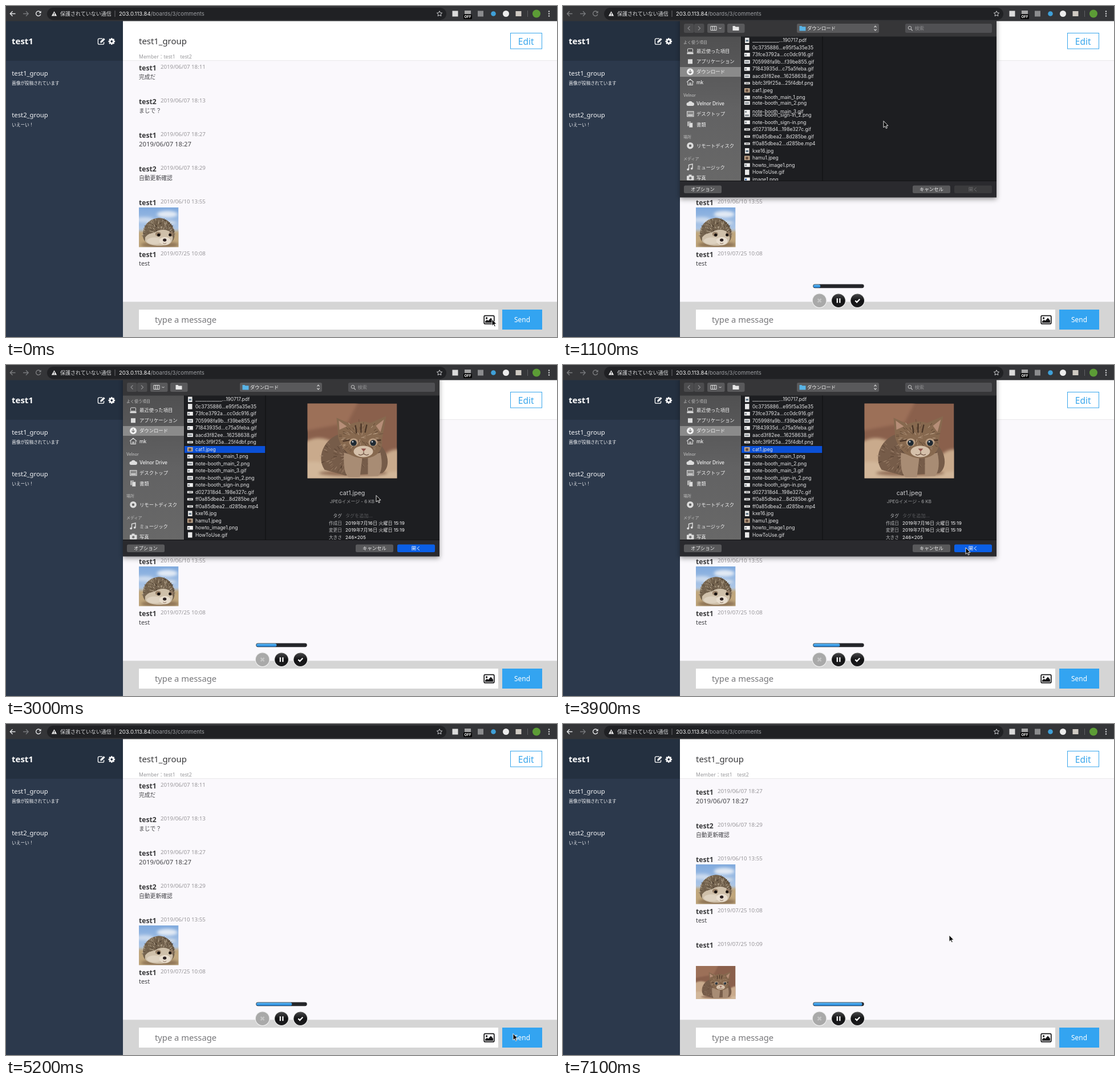
An HTML page that plays this animation: 966x580 px, repeating every 7200 ms.

```html
<!DOCTYPE html>
<html lang="ja">
<head>
<meta charset="utf-8">
<title>Group chat</title>
<style>
html,body{margin:0;width:100%;height:100%;overflow:hidden;background:#faf8fc}
svg{display:block;width:100vw;height:100vh}
text{font-family:'Noto Sans','Noto Sans CJK JP','Noto Sans CJK',sans-serif;white-space:pre}
.ui{font-family:Inter,'Noto Sans CJK JP','Noto Sans CJK',sans-serif}
</style>
</head>
<body>
<svg id="stage" viewBox="0 0 966 580" xmlns="http://www.w3.org/2000/svg"></svg>
<script>
const LOOP = 7200, STEP = 100;
const stage = document.getElementById('stage');

// ---- markup helpers; text is placed by its vertical centre
const text = (x, cy, s, size, fill, more = '') =>
  `<text x="${x}" y="${(cy + size * .36).toFixed(2)}" font-size="${size}" fill="${fill}" ${more}>${s}</text>`;
const ui = (x, cy, s, size, fill, more = '') => text(x, cy, s, size, fill, 'class="ui" ' + more);
const rect = (x, y, w, h, fill, more = '') =>
  `<rect x="${x}" y="${y}" width="${w}" height="${h}" fill="${fill}" ${more}/>`;
const circle = (x, y, r, fill, more = '') => `<circle cx="${x}" cy="${y}" r="${r}" fill="${fill}" ${more}/>`;
const oval = (x, y, rx, ry, fill, more = '') =>
  `<ellipse cx="${x}" cy="${y}" rx="${rx}" ry="${ry}" fill="${fill}" ${more}/>`;
const path = (d, fill, more = '') => `<path d="${d}" fill="${fill}" ${more}/>`;
const line = (d, color, w = 1, more = '') => path(d, 'none', `stroke="${color}" stroke-width="${w}" ${more}`);
const group = (id, body, more = '') => `<g id="${id}" ${more}>${body}</g>`;
const blur = (kind, body) => `<g filter="url(#${kind})">${body}</g>`;
const MID = 'text-anchor="middle"', END = 'text-anchor="end"', BOLD = 'font-weight="700"', SEMI = 'font-weight="500"';

let seed = 7;
const rnd = () => (seed = seed * 16807 % 2147483647) / 2147483647;

// short hairs that point away from a centre
function hairs(n, cx, cy, rx, ry, colors, len, turn = Math.PI) {
  let s = '';
  for (let i = 0; i < n; i++) {
    const a = Math.PI + turn * rnd(), r = Math.sqrt(rnd());
    const x = cx + Math.cos(a) * rx * r, y = cy + Math.sin(a) * ry * r;
    s += line(`M${x.toFixed(1)} ${y.toFixed(1)}l${(Math.cos(a) * len).toFixed(1)} ${(Math.sin(a) * len).toFixed(1)}`,
      colors[i % colors.length], .9);
  }
  return s;
}

const gradient = (id, ...stops) => `<linearGradient id="${id}" x2="0" y2="1">` +
  stops.map((c, i) => `<stop offset="${i / (stops.length - 1)}" stop-color="${c}"/>`).join('') + '</linearGradient>';
const clip = (id, x, y, w, h) => `<clipPath id="${id}">${rect(x, y, w, h, '#000')}</clipPath>`;

const hedgehog =
  rect(0, 0, 70, 70, 'url(#sky)') +
  blur('soft', oval(50, 12, 18, 6, '#e2eaf4') + oval(10, 22, 16, 5, '#cbdaee') + oval(40, 27, 26, 4, '#d9e2ea') +
    rect(-5, 41, 80, 34, '#c0a67c') + oval(37, 66, 34, 6, '#8f7556')) +
  blur('blend',
    path('M7 51C6 32 18 20 35 18.5C52 19 64 34 63 50C62 61 54 65 40 66C22 68 9 64 7 51Z', '#75644f') +
    hairs(170, 35, 50, 28, 30, ['#3f3327', '#c2b39c', '#5c4c3c', '#a1907a'], 3) +
    path('M11 53C16 45 24 46 30 43C37 38 50 38 56 44C63 52 60 62 51 66C38 69 15 68 11 59Z', '#cfc0aa') +
    oval(28, 59, 14, 6, '#ded2c0') + oval(46, 59, 10, 7, '#e8ddce') +
    oval(34, 47, 5, 4, '#9a836b') + oval(57, 47, 4, 4, '#8f7862') +
    circle(35, 48.5, 2.7, '#17110e') + circle(55, 48.5, 2.5, '#17110e') + oval(45.5, 57.5, 3.2, 2.6, '#2b2020') +
    line('M42.5 63q3 2 6 0', '#8b705c'));

const kitten =
  rect(0, 0, 157, 131, '#8a604c') +
  blur('soft', path('M-5 -5H90L70 34L-5 48Z', '#9c7059') + path('M-5 68Q20 52 50 70L130 96Q146 76 165 82V140H-5Z', '#c9aa8c') +
    path('M-5 104Q30 94 70 128L165 118V140H-5Z', '#d2b79a') + oval(80, 122, 60, 6, '#947058')) +
  blur('blend',
    path('M52 55C27 66 16 96 30 116L66 126L131 122C147 112 142 82 124 69Z', '#765c49') +
    hairs(110, 75, 92, 52, 28, ['#513b2d', '#9a7c65', '#674c3a', '#ad917a'], 6, 6.28) +
    path('M64 86Q62 122 72 129H92L96 96ZM106 92L106 127H124Q134 114 128 86Z', '#a88c74') +
    path('M54 60L51 25L76 36Q94 28 110 34L138 22L131 62Q133 92 103 96Q65 97 54 60Z', '#87694f') +
    hairs(90, 93, 60, 36, 28, ['#5b4332', '#ad9078', '#6d523f', '#c0a68d'], 5, 6.28) +
    path('M56 46L55 30L69 40ZM120 39L134 28L128 50Z', '#b68e78') +
    line('M84 38l2 14M94 35v16M104 37l-3 14M62 66l13-2M129 64l-12 1', '#4b3628', 2.4) +
    oval(98, 84, 17, 10, '#d5c0aa') + oval(81, 68, 8, 7, '#b99d83') + oval(115, 68, 8, 7, '#b99d83') +
    circle(81, 69, 5.2, '#202a33') + circle(115, 69, 5.2, '#202a33') +
    circle(79.5, 67, 1.3, '#dfe6ec') + circle(113.5, 67, 1.3, '#dfe6ec') +
    path('M94 79h9l-4.5 5Z', '#8e5049') + line('M98.5 84v4q-5 4-9 1m9-1q5 4 9 1', '#6c5040', 1.2));

// ---- browser bar
const nav = line('M16.5 13.5H7.5M11.5 9.3L7.3 13.5L11.5 17.7', '#e4e5e7', 1.4) +
  line('M60.2 10.8A4.2 4.2 0 1 0 60.8 14.5', '#e4e5e7', 1.4) + path('M61.6 8.4V12.6H57.4Z', '#e4e5e7');
const bar =
  rect(0, 0, 966, 26.5, '#343538') + rect(72, 3, 700, 21.5, '#202124', 'rx="10.7"') +
  group('nav', nav) +
  line('M30 13.5H39M35 9.3L39.2 13.5L35 17.7', '#77797c', 1.3) +
  path('M84.5 9.3L89.2 17.6H79.8Z', '#e8e8e8') + line('M84.5 12v3M84.5 15.6v1', '#202124', 1) +
  ui(95, 13.5, '保護されていない通信', 9, '#d8d9db') +
  rect(190.5, 8, 1, 11, '#6a6b6e') +
  ui(198, 13.5, '203.0.113.84<tspan fill="#9b9da1">/boards/3/comments</tspan>', 9.5, '#f2f2f2') +
  line('M760 8.8l1.4 3 3.2.4-2.4 2.2.7 3.2-2.9-1.6-2.9 1.6.7-3.2-2.4-2.2 3.2-.4Z', '#d0d1d3', 1) +
  rect(782.5, 8.5, 10, 10, '#dcdcdc') +
  rect(804, 8, 11, 6, '#a5a5a5') + rect(802, 14.5, 15, 8.5, '#050505', 'rx="1.5"') +
  ui(809.5, 18.8, 'OFF', 6.2, '#fff', MID + BOLD) +
  rect(827, 8.5, 10, 10, '#8b8c8e') + circle(854.5, 13.5, 4.3, '#3fa0d8') + circle(876.5, 13.5, 5.5, '#ececec') +
  rect(893.5, 9, 10, 9, '#cfcac3') + rect(914, 8, 1, 11, '#606164') + circle(930, 13.5, 7, '#5c9c36') +
  [9.5, 13.5, 17.5].map(y => circle(952, y, 1.2, '#d0d1d3')).join('');

// ---- chat page
const gear = () => {
  let s = circle(185.3, 62, 4.4, '#fff');
  for (let i = 0; i < 8; i++) s += rect(184, 56.2, 2.6, 3, '#fff', `transform="rotate(${i * 45} 185.3 62)"`);
  return s + circle(185.3, 62, 1.9, '#243040');
};
const side =
  rect(0, 26, 205, 554, '#2c394c') + rect(0, 26, 205, 70, '#243040') +
  text(10, 61.5, 'test1', 15, '#fff', BOLD) +
  line('M169 57.2H163.4Q161.4 57.2 161.4 59.2V65.4Q161.4 67.2 163.4 67.2H169.6Q171.6 67.2 171.6 65.4V63', '#fff', 1.3) +
  path('M165.3 64.6L165.6 61.8L171.2 56.2L173.6 58.6L168 64.2Z', '#fff') + gear() +
  text(10.3, 118, 'test1_group', 11.25, '#f4f5f7') + text(10.3, 135, '画像が投稿されています', 7.6, '#f4f5f7', SEMI) +
  text(10.3, 191, 'test2_group', 11.25, '#f4f5f7') + text(10.3, 208, 'いえーい！', 7.6, '#f4f5f7', SEMI);

const message = (y, name, time, body = '', size = 9.8) =>
  text(233, y, name, 12.1, '#3a3a3c', 'font-weight="600"') + text(271, y - 1.8, time, 9.7, '#98969a') +
  text(233, y + 15.5, body, size, '#434347');
const photo = (id, y, h) => `<use href="#${id}" x="233" y="${y}" width="69.5" height="${h}"/>`;

const messages =
  message(108.5, 'test1', '2019/06/07 18:11', '完成だ') +
  message(167.5, 'test2', '2019/06/07 18:13', 'まじで？') +
  message(226.5, 'test1', '2019/06/07 18:27', '2019/06/07 18:27', 11.3) +
  message(285.5, 'test2', '2019/06/07 18:29', '自動更新確認') +
  message(344.5, 'test1', '2019/06/10 13:55') + photo('hedgehog', 353, 69.5) +
  message(435.5, 'test1', '2019/07/25 10:08', 'test', 10.9) +
  group('fresh', message(494.5, 'test1', '2019/07/25 10:09') + photo('kitten', 531, 58));

const page =
  rect(205, 26, 761, 554, '#faf8fc') +
  `<g clip-path="url(#feed)">${group('messages', messages)}</g>` +
  rect(205, 26, 761, 69.5, '#fff') + rect(205, 95.2, 761, 1, '#e9e8ea') +
  text(233, 62, 'test1_group', 14.9, '#38383a') +
  text(233, 88.5, 'Member：test1　test2', 8.7, '#97979a') +
  rect(884.5, 47.5, 55, 27.5, '#fff', 'stroke="#38a6ec"') + text(911.7, 62, 'Edit', 15.5, '#38a6ec', MID) +
  rect(205, 518.3, 761, 62, '#d5d5d5') + rect(233, 532, 630, 35, '#fff') +
  text(261, 550, 'type a message', 14.75, '#77777a') +
  rect(838.2, 542.7, 17.6, 14.2, '#fff', 'rx="2" stroke="#19191b" stroke-width="1.7"') +
  circle(842.6, 547, 1.7, '#19191b') + path('M840 555V552.5L843.4 549.8L845.5 551.6L850 546.5L854 551V555Z', '#19191b') +
  rect(870, 532, 70, 35, '#33a4f1') + text(905, 549.8, 'Send', 11.9, '#fff', MID);

// ---- file sheet
const ICONS = {
  recent: y => rect(218.5, y - 4.5, 9, 6, 'none', 'rx="1" stroke="#ddd"') + rect(217.5, y + 2, 11, 3, '#ddd'),
  apps: y => rect(219, y - 4, 8, 8, '#ddd'),
  down: y => circle(223, y, 6, '#f2f2f2') + line(`M223 ${y - 3.5}v6m-2.8-2.7l2.8 2.8 2.8-2.8`, '#777', 1.3),
  home: y => line(`M217 ${y}l6-5.2 6 5.2M218.8 ${y}v5h8.4v-5M222 ${y + 5}v-3.5h2.2v3.5`, '#ddd', 1.1),
  cloud: y => path(`M219.5 ${y + 4}a3 3 0 0 1 0-6a4.2 4.2 0 0 1 7.5 0a3 3 0 0 1 0 6Z`, '#ddd'),
  desk: y => rect(217.5, y - 4.5, 11.5, 9, '#8a8a8a', 'stroke="#ddd"') + rect(219, y + 1, 8.5, 2, '#ddd'),
  docs: y => rect(218, y - 5, 6, 8, '#bbb') + rect(221, y - 3, 6.5, 8.5, '#ddd', 'stroke="#666" stroke-width=".6"'),
  disc: y => circle(223, y, 4, 'none', 'stroke="#ddd" stroke-width="3.6"'),
  note: y => line(`M220.5 ${y + 3.5}v-7.5l6.5-1.5v7.5`, '#ddd', 1.4) + circle(219.2, y + 3.8, 1.9, '#ddd') + circle(225.7, y + 2.3, 1.9, '#ddd'),
  camera: y => rect(217, y - 3, 12.5, 8, '#ddd', 'rx="1"') + rect(220.5, y - 5, 5, 3, '#ddd') + circle(223.2, y + 1, 2.2, '#777')
};
const PLACES = [
  [63, 'よく使う項目'], [79.3, '最近使った項目', 'recent'], [97.3, 'アプリケーション', 'apps'],
  [115.3, 'ダウンロード', 'down'], [133.5, 'mk', 'home'],
  [156, 'Velnor'], [171, 'Velnor Drive', 'cloud'], [189.2, 'デスクトップ', 'desk'], [207.5, '書類', 'docs'],
  [229, '場所'], [244.7, 'リモートディスク', 'disc'],
  [267, 'メディア'], [282.5, 'ミュージック', 'note'], [300.5, '写真', 'camera']
];
const places = PLACES.map(([y, s, icon]) => icon
  ? ICONS[icon](y) + ui(234, y, s, 8.35, '#f0f0f0', SEMI)
  : ui(211, y, s, 7, '#bcbcbc', SEMI)).join('');

const FILES = ('____________...190717.pdf 0c3735886...e95f5a35e35 73fce3792a...cc0dc916.gif 705998fa9b...f39be855.gif ' +
  '71843935d...c75a5feba.gif aacd3f82ee...16258638.gif bbfc3f9f25a...25f4dbf.png cat1.jpeg note-booth_main_1.png ' +
  'note-booth_main_2.png note-booth_main_3.gif note-booth_sign-in_2.png note-booth_sign-in.png ' +
  'd027318d4...198e327c.gif ff0a85dbea2...8d285be.gif ff0a85dbea2...d285be.mp4 kxe16.jpg hamu1.jpeg ' +
  'howto_image1.png HowToUse.gif image1.png').split(' ');
const thumb = (i, y) => [0, 1, 16, 19].includes(i)
  ? rect(319, y - 4.7, 7.5, 9.4, '#e8e8e8') + (i % 16 ? '' : rect(320.5, y - 1, 4.5, 3, '#5b7080'))
  : i === 7 || i === 17 ? rect(318, y - 3.8, 9.5, 7.6, '#c3a98e') + rect(320, y - 2, 5, 4.5, '#6c5241')
  : [6, 13, 14, 15].includes(i) ? rect(317.8, y - 2, 10, 4, '#ececec') + rect(320, y - .5, 6, 1, '#444')
  : rect(317.8, y - 3.3, 10, 6.6, '#f0f0f0') + rect(319, y - 1.2, i % 2 ? 7 : 3, 2.8, i === 20 ? '#2b5a9a' : '#8b9298');
const files = FILES.map((s, i) => {
  const y = 60.3 + i * 12.5;
  return group('file' + i, thumb(i, y) + ui(332, y, s, 8.5, '#e4e4e5'));
}).join('');

const INFO = [['タグ', 'タグを追加...'], ['作成日', '2019年7月16日 火曜日 15:19'],
  ['変更日', '2019年7月16日 火曜日 15:19'], ['大きさ', '246×205']];
const preview =
  `<use href="#kitten" x="528.5" y="67.5" width="157" height="131"/>` +
  ui(607, 224.3, 'cat1.jpeg', 10.6, '#d0d0d2', MID) +
  ui(607, 239, 'JPEGイメージ - 6 KB', 8, '#929395', MID + SEMI) +
  INFO.map(([a, b], i) => ui(589, 264.5 + i * 12.5, a, 7.7, '#b4b5b7', END + SEMI) +
    ui(595, 264.5 + i * 12.5, b, 8.1, i ? '#dededf' : '#57585b', SEMI)).join('');

const button = (x, y, w, h, fill = '#59595b') => rect(x, y, w, h, fill, 'rx="2.5"');
const sheet =
  rect(205, 20, 555, 315.5, '#2b2b2d', 'filter="url(#shadow)"') +
  rect(205, 20, 555, 34, '#363638') +
  button(212, 31, 17.5, 16, '#4c4c4e') + button(230, 31, 17.5, 16, '#4c4c4e') +
  line('M222.5 35.5l-3.5 3.5 3.5 3.5M237 35.5l3.5 3.5-3.5 3.5', '#8a8a8c', 1.2) +
  button(253, 31, 30.5, 16) + line('M259 35.5h10v7h-10ZM262.3 35.5v7M265.7 35.5v7M273.5 38l2 2 2-2', '#e0e0e0', 1) +
  button(288, 31, 30.5, 16) + path('M297.5 35h4l1 1.5h6v6.5h-11Z', '#e6e6e6') +
  button(410, 31, 144, 16) + path('M414.5 35h4l1 1.3h6v7.2h-11Z', '#58b3e6') + ui(428, 39, 'ダウンロード', 8.35, '#f0f0f0', SEMI) +
  line('M545.5 37.5l2-2.3 2 2.3M545.5 40.7l2 2.3 2-2.3', '#e8e8e8', 1.1) +
  button(600, 31, 152, 16, '#505053') + circle(608, 38.3, 2.8, 'none', 'stroke="#c8c8c8"') + line('M610 40.5l2.8 2.8', '#c8c8c8', 1.1) +
  ui(616.5, 39, '検索', 8.3, '#8f8f91') +
  rect(205, 53.5, 555, 253, '#1d1e21') +
  rect(205, 53.5, 107, 253, '#343537') +
  group('lit', rect(205, 53.5, 107, 253, 'url(#panel)') + rect(205, 107, 107, 17, '#8b8b8b')) +
  `<g clip-path="url(#body)">${group('places', places)}` +
  group('pick', rect(313, 142, 141.5, 12, '#0b50d6') + preview) + group('files', files) + '</g>' +
  rect(312, 53.5, 1, 253, '#111113') + rect(454.5, 53.5, 1, 253, '#0e0f11') + rect(205, 306, 555, 1, '#121214') +
  button(212, 314.5, 66, 13.5) + ui(245, 321.3, 'オプション', 8.4, '#f0f0f0', MID + SEMI) +
  button(613, 314.5, 66, 13.5) + ui(646, 321.3, 'キャンセル', 8.4, '#f0f0f0', MID + SEMI) +
  button(686, 314.5, 66, 13.5, '#3b3b3d') + group('ready', button(686, 314.5, 66, 13.5, '#0b5fe6')) +
  ui(719, 321.3, '開く', 8.4, '#f0f0f0', 'id="open" ' + MID + SEMI);

// ---- recorder controls
const knob = (x, fill) => circle(x, 516.2, 12.4, fill, 'stroke="#eee" stroke-width="1.2"');
const recorder =
  rect(438.3, 487.4, 89.4, 6.8, '#25262a', 'rx="3.4"') +
  rect(439, 488.2, 0, 5.2, 'url(#fill)', 'id="progress" rx="2.6"') +
  knob(449.6, '#a9a9a9') + line('M446.6 513.2l6 6m0-6l-6 6', '#c4c4c4', 2.4) +
  knob(483, 'url(#knob)') + line('M480.8 512.2v8M485.4 512.2v8', '#fff', 2.2) +
  knob(516.2, 'url(#knob)') + line('M512.3 516.3l2.8 2.8 5.2-5.4', '#fff', 2.3);

stage.innerHTML = '<defs>' +
  gradient('sky', '#7fa9dd', '#a9c4e6', '#dce4e8') + gradient('panel', '#505051', '#626263', '#686868') +
  gradient('fill', '#64bdf6', '#1f82d8') + gradient('knob', '#4c4c4e', '#121214', '#1d1d1f') +
  '<filter id="soft"><feGaussianBlur stdDeviation="2.5"/></filter>' +
  '<filter id="blend"><feGaussianBlur stdDeviation=".6"/></filter>' +
  '<filter id="shadow" x="-10%" y="-10%" width="120%" height="125%"><feDropShadow dx="0" dy="3" stdDeviation="4" flood-opacity=".4"/></filter>' +
  clip('feed', 205, 96, 761, 422.3) + clip('body', 205, 53.5, 555, 252.5) + clip('under', 0, 26, 966, 554) +
  `<symbol id="hedgehog" viewBox="0 0 70 70">${hedgehog}</symbol>` +
  `<symbol id="kitten" viewBox="0 0 157 131" preserveAspectRatio="none">${kitten}</symbol></defs>` +
  page + side + `<g clip-path="url(#under)">${group('sheet', sheet)}</g>` + bar + group('recorder', recorder) +
  group('pointer', path('M0 0V11.4L2.7 9L4.5 13L6.3 12.2L4.6 8.3H8Z', '#050505', 'stroke="#fff" stroke-width=".9"'));

// ---- motion
const el = id => document.getElementById(id);
const ease = p => (p = Math.min(1, Math.max(0, p)), p * p * (3 - 2 * p));
const show = (id, on) => el(id).setAttribute('visibility', on ? 'inherit' : 'hidden');
const move = (id, x, y) => el(id).setAttribute('transform', `translate(${x} ${y})`);

const POINTER = [[0, 852, 549], [600, 852, 549], [1100, 562, 201.5], [1700, 362, 148], [2300, 362, 148],
  [3000, 649, 228.5], [3500, 706, 320], [4400, 706, 320], [5100, 889, 542.5], [5600, 889, 542.5], [6500, 677, 370], [LOOP, 677, 370]];

function pointerAt(t) {
  const i = POINTER.findIndex(k => k[0] > t);
  const [t0, x0, y0] = POINTER[i - 1], [t1, x1, y1] = POINTER[i];
  const p = ease((t - t0) / (t1 - t0));
  return [x0 + (x1 - x0) * p, y0 + (y1 - y0) * p];
}

function draw(t) {
  const drop = ease((t - 296) / 400) - ease((t - 3996) / 400);
  const picked = t >= 2000;
  show('sheet', drop > 0);
  move('sheet', 0, (drop - 1) * 308);
  show('lit', t >= 700);
  el('places').setAttribute('opacity', t >= 700 ? 1 : .65);
  show('files', t >= 900);
  show('pick', picked);
  show('ready', picked);
  el('open').setAttribute('fill', picked ? '#fff' : '#737375');
  el('nav').setAttribute('opacity', t >= 600 && t < 4400 ? .4 : 1);

  const gap = 1 - ease((t - 1000) / 200);
  FILES.forEach((_, i) => move('file' + i, 0, i > 10 ? -13 * gap : i === 9 ? -6 * gap : 0));
  show('file10', t >= 1100);

  show('fresh', t >= 6200);
  move('messages', 0, -107 * ease((t - 6200) / 400));

  show('recorder', t > 0);
  el('progress').setAttribute('width', Math.max(0, 88 * t / LOOP - 1.2));
  move('pointer', ...pointerAt(t));
}

function tick() {
  draw(Math.floor(performance.now() % LOOP / STEP) * STEP);
  requestAnimationFrame(tick);
}
tick();
</script>
</body>
</html>
```
